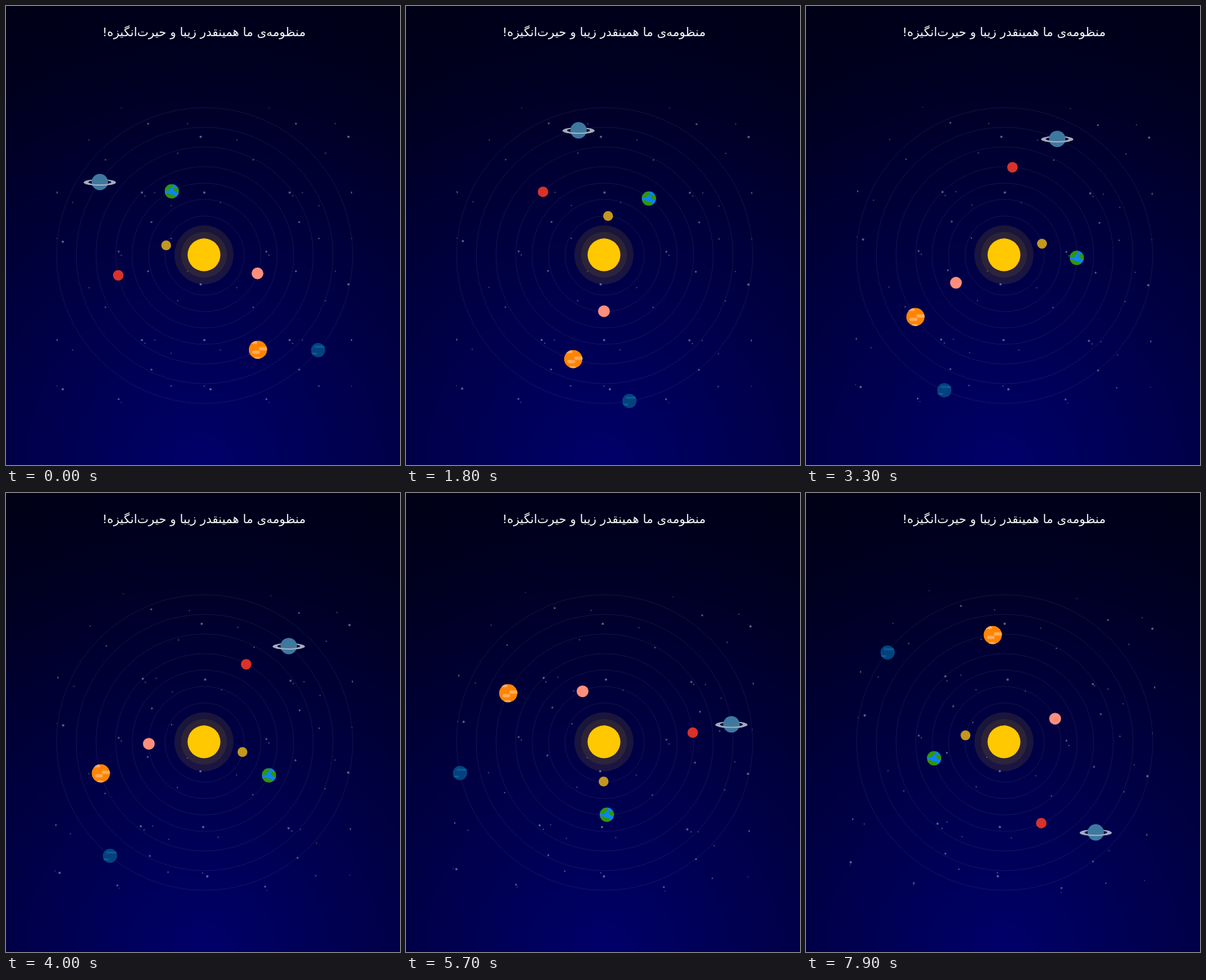
Write an HTML page that moves like this. It is 600 by 700 pixels and loops after 8000 ms.

```html
<!DOCTYPE html>
<html lang="fa">
<head>
<meta charset="utf-8">
<style>
  html, body { margin: 0; width: 100%; height: 100%; overflow: hidden; background: #000018; }
  svg { display: block; width: 600px; height: 700px; }
  text { font: 18.4px "DejaVu Sans", sans-serif; fill: #fff; direction: rtl; text-anchor: middle; }
</style>
</head>
<body>
<svg viewBox="0 0 600 700">
  <defs>
    <radialGradient id="sky" gradientUnits="userSpaceOnUse" cx="300" cy="700" r="762">
      <stop offset="0" stop-color="#00006a"/>
      <stop offset=".45" stop-color="#000042"/>
      <stop offset=".82" stop-color="#00001f"/>
      <stop offset="1" stop-color="#000016"/>
    </radialGradient>
    <clipPath id="field"><rect x="77" y="155" width="450" height="450"/></clipPath>
    <clipPath id="earthDisc"><circle r="11"/></clipPath>
    <clipPath id="jupiterDisc"><circle r="14"/></clipPath>
    <clipPath id="neptuneDisc"><circle r="11"/></clipPath>
    <clipPath id="front"><rect x="-25" y=".5" width="50" height="8"/></clipPath>
    <path id="ring" fill="#a4adbd" fill-rule="evenodd"
      d="M-24.5 .5a24.5 5 0 1 0 49 0a24.5 5 0 1 0 -49 0zM-17.5 .3a17.5 3.3 0 1 0 35 0a17.5 3.3 0 1 0 -35 0z"/>
  </defs>
  <rect width="600" height="700" fill="url(#sky)"/>
  <g id="stars" fill="#d5d5ee"></g>
  <g id="orbits" fill="none" stroke="#fff" stroke-opacity=".075"></g>
  <g fill="#ffc800">
    <circle cx="301.5" cy="379.5" r="45" opacity=".1"/>
    <circle cx="301.5" cy="379.5" r="35" opacity=".08"/>
    <circle cx="301.5" cy="379.5" r="25"/>
  </g>
  <g id="mercury"><circle r="7.5" fill="#c4981f"/></g>
  <g id="venus"><circle r="9" fill="#ff8f7c"/></g>
  <g id="earth" clip-path="url(#earthDisc)">
    <circle r="11" fill="#0a84ff"/>
    <path fill="#329600" d="M-11 -5L-5 -10L1 -11L2 -7L-2 -5L-4 -1L-11 -1zM2 -5L8 -6L11 -2L10 3L5 1L3 -2zM-11 3L-5 2L-3 5L2 5L6 8L3 12L-6 12z"/>
  </g>
  <g id="mars"><circle r="8" fill="#d9322b"/></g>
  <g id="jupiter" clip-path="url(#jupiterDisc)">
    <circle r="14" fill="#ff8400"/>
    <g fill="#ffac59">
      <rect x="-12" y="-13.5" width="11" height="4.5" rx="2.2"/>
      <rect x="1.5" y="-4" width="14" height="5" rx="2.5"/>
      <rect x="-9" y="1.2" width="12" height="5" rx="2.5"/>
      <rect x="-6" y="10.8" width="10" height="5" rx="2.5"/>
    </g>
  </g>
  <g id="saturn">
    <use href="#ring"/>
    <circle r="12.5" fill="#3f789f"/>
    <use href="#ring" clip-path="url(#front)"/>
  </g>
  <g id="neptune" clip-path="url(#neptuneDisc)">
    <circle r="11" fill="#04427f"/>
    <g fill="#0b5b96">
      <rect x="-5.5" y="-6.5" width="16" height="3" rx="1.5"/>
      <rect x="-12" y="4" width="10.5" height="3" rx="1.5"/>
    </g>
  </g>
  <text x="301.5" y="46">منظومه&zwnj;ی ما همینقدر زیبا و حیرت&zwnj;انگیزه!</text>
</svg>
<script>
const LOOP = 8000, STEP = 100, TILE = 225;
const byId = id => document.getElementById(id);

function add(parent, tag, attrs) {
  const el = document.createElementNS("http://www.w3.org/2000/svg", tag);
  for (const key in attrs) el.setAttribute(key, attrs[key]);
  return parent.appendChild(el);
}

// Orbit radius, seconds per turn, starting angle in degrees
const planets = [
  ["mercury", 60, 8, 194.5],
  ["venus", 85, 9, 18.7],
  ["earth", 110, 10, 243],
  ["mars", 135, 11, 167.05],
  ["jupiter", 165, 14, 60.55],
  ["saturn", 195, 15, 215.05],
  ["neptune", 225, 16, 39.85]
].map(([id, radius, period, start]) => {
  add(byId("orbits"), "circle", { cx: 302.5, cy: 380.5, r: radius + .5 });
  return { el: byId(id), center: id === "mercury" ? [302, 380] : [302.5, 380.5], radius, period, start };
});

// Each layer: seconds per turn and the stars of one tile as x, y, radius
const layers = [
  [90, [[139.5, 24.5, 1.5], [149.5, 129.5, 1], [24.5, 144.5, 1], [174.5, 149.5, 1], [174.5, 199.5, 1.2], [9.5, 204.5, 1.8]]],
  [120, [[98.5, 0, 1.1], [199.5, 24.5, 1], [0, 129.5, 1.8], [130, 129.5, 1.7], [144.5, 174.5, 1.5], [0, 199.5, 1.1]]],
  [150, [[219.5, 44.5, 1.8], [49.5, 49.5, 1], [184.5, 69.5, 1.1], [74.5, 79.5, 1.2], [134.5, 134.5, 1.1], [94.5, 219.5, 1.5]]]
].map(([period, stars]) => {
  const el = add(byId("stars"), "g", { "clip-path": "url(#field)" });
  for (const [x, y, r] of stars)
    for (let col = 0; col < 3; col++)
      for (let row = 0; row < 3; row++)
        add(el, "circle", { cx: 77 + x + col * TILE, cy: 155 + y + row * TILE, r, opacity: .2 + r * .13 });
  return { el, period };
});

// cubic-bezier(.42, 0, .58, 1)
function easeInOut(x) {
  let u = x;
  for (let i = 0; i < 6; i++) {
    const error = 1.26 * u - .78 * u * u + .52 * u ** 3 - x;
    u -= error / (1.26 - 1.56 * u + 1.56 * u * u);
  }
  return u * u * (3 - 2 * u);
}

function draw(seconds) {
  for (const { el, center, radius, period, start } of planets) {
    const angle = (start + 360 * seconds / period) * Math.PI / 180;
    const x = center[0] + radius * Math.cos(angle);
    const y = center[1] + radius * Math.sin(angle);
    el.setAttribute("transform", `translate(${x.toFixed(2)} ${y.toFixed(2)})`);
  }
  for (const { el, period } of layers)
    el.setAttribute("transform", `rotate(${360 * easeInOut(seconds / period)} 302 380)`);
}

const begin = performance.now();
function tick() {
  const elapsed = (performance.now() - begin) % LOOP;
  draw(Math.floor(elapsed / STEP) * STEP / 1000);
  requestAnimationFrame(tick);
}
tick();
</script>
</body>
</html>
```
